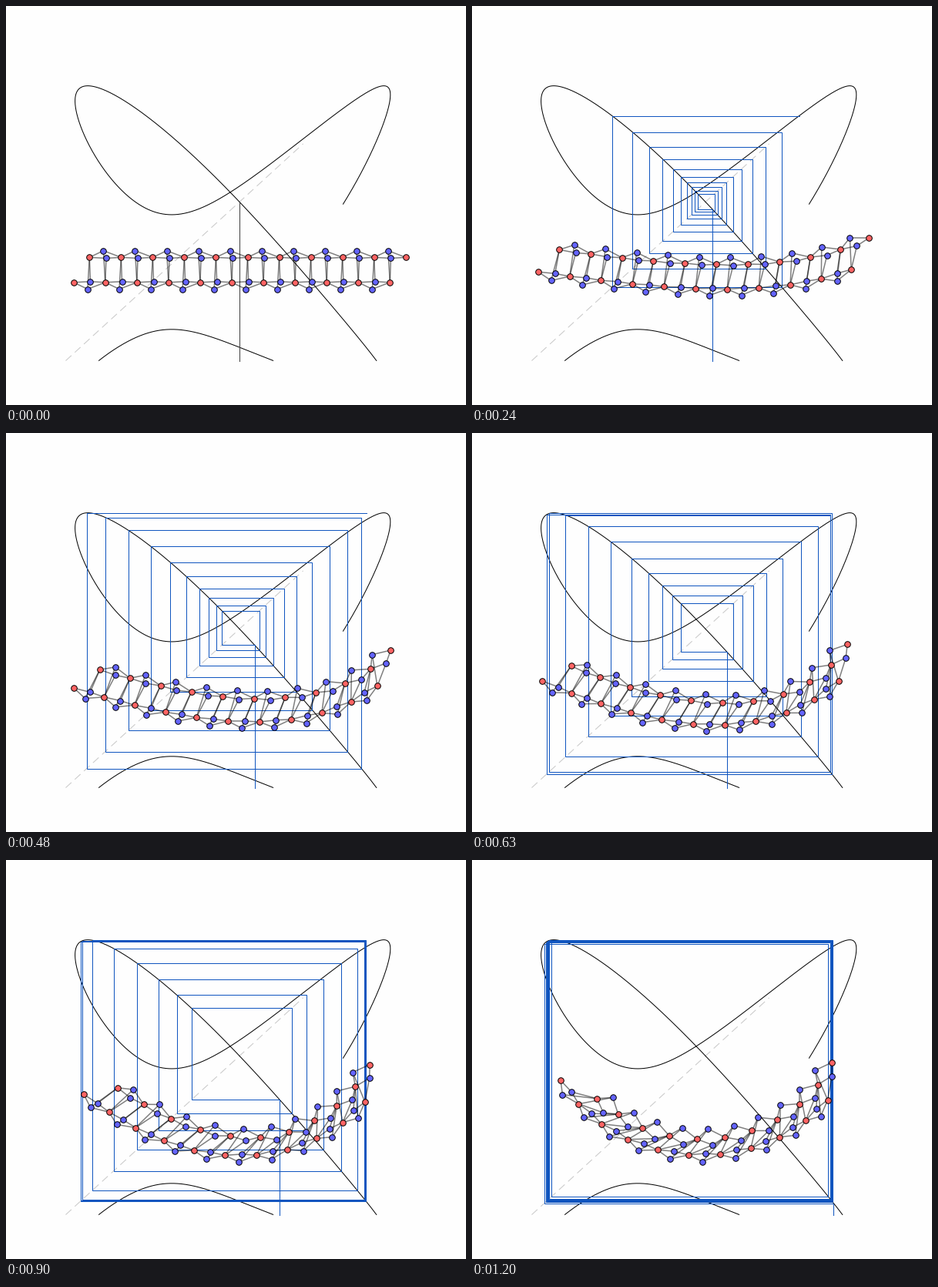
A matplotlib script that plays this animation: 597x518 px, repeating every 1230 ms.

```python
import numpy as np
import matplotlib.pyplot as plt
from matplotlib.animation import FuncAnimation
from matplotlib.collections import LineCollection

W, H, DPI = 597, 518, 128
PX = 72 / DPI                       # one pixel in points
FRAMES, INTERVAL = 41, 30
MODULES = 20

# Lattice and map share one aspect ratio
UNIT, ASPECT = 23.70, 0.914
CENTER = (303.4, 343.1)
MAP_SCALE, LEFT, BOTTOM = 13 * UNIT, 78, 461

# Rest shape of one module: three joints and two inner nodes, a and b
SIDE = np.sqrt(3)
J0, J1, J2 = -SIDE / 2 - 0.5j, 1j, SIDE / 2 - 0.5j
A, B = -0.1005 - 0.9008j, 0.0502 - 0.449j
A0, A1, A2 = (abs(A - j) for j in (J0, J1, J2))
B0, B1, B2 = (abs(B - j) for j in (J0, J1, J2))


def angle(d, near, far):
    """Angle at a joint between the side d and the bar called near."""
    cos = (d**2 + near**2 - far**2) / (2 * d * near)
    return np.arccos(np.clip(cos, -1, 1))


def module(prev, apex, flip=1, side_a=1, side_b=1):
    """Place both inner nodes and the next joint."""
    d = abs(prev - apex)
    u = (prev - apex) / d
    a = apex + u * A1 * np.exp(1j * flip * side_a * angle(d, A1, A0))
    b = apex + u * B1 * np.exp(1j * flip * side_b * angle(d, B1, B0))
    c = abs(b - a)
    along = (c**2 + A2**2 - B2**2) / (2 * c)
    across = np.sqrt(np.maximum(A2**2 - along**2, 0))
    return a, b, a + (b - a) / c * (along - 1j * flip * across)


def chain(d):
    """Joints and inner nodes for an array of first distances."""
    joints = [0j * d, d * np.exp(1j * np.pi / 3)]
    inner = []
    for n in range(MODULES):
        a, b, nxt = module(joints[-2], joints[-1], flip=1 - 2 * (n % 2))
        inner += [a, b]
        joints.append(nxt)
    nodes = np.array(joints + inner).T
    return nodes - nodes.mean(axis=1, keepdims=True)


def motion():
    """Unfold at constant speed without net rotation."""
    d = np.linspace(SIDE, 2.2735, 700)
    nodes = chain(d)
    turn, length = np.zeros(len(d)), np.zeros(len(d))
    for k in range(1, len(d)):
        before = nodes[k - 1]
        twist = -np.angle(np.sum(np.conj(before) * nodes[k]))
        nodes[k] *= np.exp(1j * twist)
        turn[k] = twist
        length[k] = length[k - 1] + np.linalg.norm(nodes[k] - before)
    step = np.interp(2.0362, d, length) / 36
    first = np.interp(step * np.arange(FRAMES), length, d)
    spin = np.interp(first, d, turn)
    return chain(first) * np.exp(1j * spin)[:, None]


def to_map(x, y):
    return (LEFT + (x - 1) * MAP_SCALE,
            BOTTOM - (y - 1) * MAP_SCALE * ASPECT)


def map_curve():
    low, high = A1 - A0, B1 + B0
    mid, amp = (high + low) / 2, (high - low) / 2
    end = 2 * np.pi + np.arccos((2.1685 - mid) / amp)
    t = np.linspace(-np.pi, end, 4000)
    d = mid + amp * np.cos(t)
    side_a = np.where(t < np.pi, 1, -1)
    side_b = np.where((t > 0) & (t < 2 * np.pi), 1, -1)
    out = abs(module(d + 0j, 0j, 1, side_a, side_b)[2])
    return to_map(d, np.where(out < 1, np.nan, out))


def cobweb(dist):
    xs = np.repeat(dist, 2)
    ys = np.concatenate([[1], np.repeat(dist[1:], 2), [dist[-1]]])
    return to_map(xs[:len(ys) - 1], ys[:-1])


poses = motion()
pts = np.stack([CENTER[0] + UNIT * poses.real,
                CENTER[1] - UNIT * ASPECT * poses.imag], axis=-1)
JOINTS = MODULES + 2
bars = [(n + k, JOINTS + 2 * n + m)
        for n in range(MODULES) for m in range(2) for k in range(3)]

fig = plt.figure(figsize=(W / DPI, H / DPI), dpi=DPI, facecolor="#fefefe")
ax = fig.add_axes([0, 0, 1, 1])
# Pixel centres counted from one
ax.set_xlim(0.5, W + 0.5)
ax.set_ylim(H + 0.5, 0.5)
ax.axis("off")

ax.plot(*to_map(np.array([1, 2]), np.array([1, 2])), color="#c8c8c8",
        lw=PX, ls=(0, (10, 6)), dash_capstyle="butt", zorder=1)
ax.plot(*map_curve(), color="black", lw=PX, zorder=2)
web, = ax.plot([], [], lw=PX, solid_joinstyle="miter", zorder=3)
rods = LineCollection([], colors=[(0, 0, 0, 0.5)], linewidths=1.5 * PX,
                      zorder=4)
ax.add_collection(rods)


def dots(color, z):
    return ax.plot([], [], "o", ms=7.6 * PX, mfc=color, mec="black",
                   mew=PX, zorder=z)[0]


red, blue = dots("#ff6464", 5), dots("#6464ff", 6)


def draw(i):
    p = pts[i]
    web.set_data(*cobweb(abs(np.diff(poses[i, :JOINTS]))))
    web.set_color("#1055bf" if i else "#404040")
    rods.set_segments([p[list(bar)] for bar in bars])
    red.set_data(*p[:JOINTS].T)
    blue.set_data(*p[JOINTS:].T)
    return web, rods, red, blue


anim = FuncAnimation(fig, draw, frames=FRAMES, interval=INTERVAL,
                     repeat=True, repeat_delay=0)
plt.show()
```
